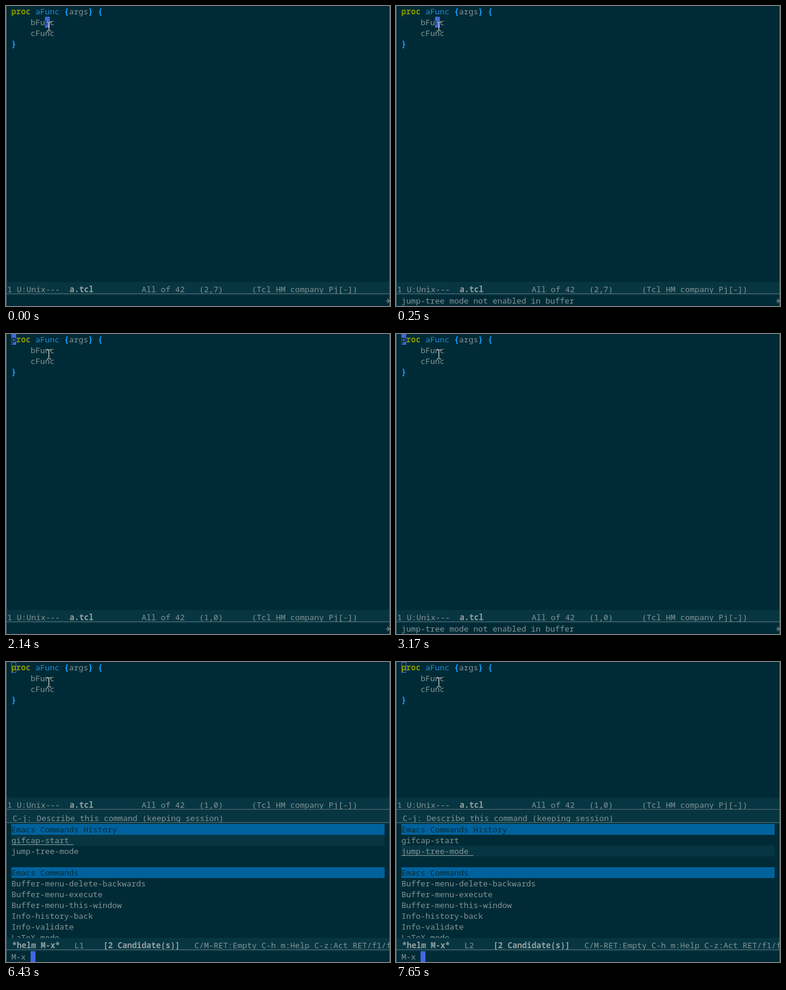
Recreate the animation shown at these times as an HTML page. Size 640 by 500 pixels, loop 8000 ms.

```html
<!DOCTYPE html>
<html lang="en">
<head>
<meta charset="utf-8">
<title>Editor session</title>
<style>
html, body { margin: 0; width: 100%; height: 100%; overflow: hidden; background: #002b36; }
#stage {
  position: relative; width: 640px; height: 500px; overflow: hidden;
  background: #002b36; color: #839496;
  font: 13.3333px/18px "Noto Sans Mono", "DejaVu Sans Mono", monospace;
  font-variant-ligatures: none;
}
#stage div, #stage svg { position: absolute; }
.text { white-space: pre; height: 18px; }
.bar { left: 1px; width: 638px; height: 22px; background: #073642; }
.bar .text { height: 16px; overflow: hidden; }
.bar::after {
  content: ""; position: absolute; left: 0; top: 19px; width: 100%; height: 1px;
  background: #586e75;
}
.bar b { color: #93a1a1; }
.head { left: 9px; width: 622px; height: 18px; background: #00629d; color: #002b36; white-space: pre; }
.pick { left: 9px; width: 622px; height: 18px; background: #073642; }
.pick i { position: absolute; left: 0; top: 16px; height: 1px; background: #839496; }
.cursor { width: 8px; height: 18px; background: #4169e1; color: #002b36; }
.hollow { box-sizing: border-box; background: none; border: 1px solid #4169e1; }
.edge { top: 0; width: 1px; height: 500px; background: #586e75; }
.key { color: #859900; font-weight: bold; }
.fn { color: #268bd2; }
.br { color: #1a9fff; font-weight: bold; }
</style>
</head>
<body>
<div id="stage"></div>
<script>
const LOOP = 8000, HELM = 6430, NEXT = 7650, ROW = 18;
const stage = document.getElementById("stage");
const start = document.timeline.currentTime || 0;

function add(parent, cls, x, y, html = "") {
  const el = document.createElement("div");
  el.className = cls;
  if (x !== null) el.style.left = x + "px";
  el.style.top = y + "px";
  el.innerHTML = html;
  parent.append(el);
  return el;
}
const text = (parent, x, y, html) => add(parent, "text", x, y, html);

function bar(parent, y, x, html) {
  const el = add(parent, "bar", null, y);
  const label = text(el, x - 1, 3, html);
  label.style.width = 640 - x + "px";
  return el;
}

// Shows an element only during the given [from, to] spans of the loop.
function during(el, ...spans) {
  const frames = [{ offset: 0, opacity: 0 }];
  for (const [from, to] of spans) {
    if (from === 0) frames[0].opacity = 1;
    else frames.push({ offset: from / LOOP, opacity: 1 });
    if (to < LOOP) frames.push({ offset: to / LOOP, opacity: 0 });
  }
  const last = frames[frames.length - 1];
  frames.push({ offset: 1, opacity: last.opacity });
  for (const frame of frames) frame.easing = "steps(1, end)";
  const run = el.animate(frames, { duration: LOOP, iterations: Infinity });
  run.startTime = start;
  return el;
}

// Code buffer
[
  '<span class="key">proc</span> <span class="fn">aFunc</span> ' +
    '<span class="br">{</span>args<span class="br">}</span> <span class="br">{</span>',
  "    bFunc",
  "    cFunc",
  '<span class="br">}</span>'
].forEach((line, i) => text(stage, 9, i * ROW, line));

during(add(stage, "cursor", 65, ROW, "n"), [0, 1990]);
during(add(stage, "cursor", 9, 0, "<b>p</b>"), [1990, HELM]);
during(add(stage, "cursor hollow", 9, 0), [HELM, LOOP]);

// Mode lines
const status = pos => "1 U:Unix---  <b>a.tcl</b>          All of 42   (" + pos +
  ")      (Tcl HM company Pj[-])";
during(bar(stage, 460, 2, status("2,7")), [0, 1990]);
during(bar(stage, 460, 2, status("1,0")), [1990, HELM]);

// Echo area
during(text(stage, 9, 482, "jump-tree mode not enabled in buffer"), [250, 1990], [3170, 6280]);
during(text(stage, 9, 482, "Mark set"), [1990, 2140]);

const arrow = add(stage, "", 633, 487,
  '<svg width="6" height="9" fill="none" stroke="#839496" stroke-width="1.2">' +
  '<path d="M0 4.5H6M2.5 1L6 4.5L2.5 8"/></svg>');
during(arrow, [0, HELM]);

// Completion window
const helm = add(stage, "", 0, 0);
during(helm, [HELM, LOOP]);
bar(helm, 226, 2, status("1,0"));
bar(helm, 248, 11, "C-j: Describe this command (keeping session)");

function pick(row, chars, from, to) {
  const el = add(helm, "pick", null, 270 + row * ROW, "<i></i>");
  el.firstChild.style.width = chars * 8 + "px";
  during(el, [from, to]);
}
pick(1, 13, HELM, NEXT);
pick(2, 15, NEXT, LOOP);

[
  "#Emacs Commands History", "gifcap-start", "jump-tree-mode", "", "#Emacs Commands",
  "Buffer-menu-delete-backwards", "Buffer-menu-execute", "Buffer-menu-this-window",
  "Info-history-back", "Info-validate", "LaTeX-mode"
].forEach((line, i) => {
  const y = 270 + i * ROW;
  if (line[0] === "#") add(helm, "head", null, y, line.slice(1));
  else text(helm, 9, y, line);
});

const helmStatus = n => "<b>*helm M-x*</b>   L" + n + "    <b>[2 Candidate(s)]</b>" +
  "   C/M-RET:Empty C-h m:Help C-z:Act RET/f1/f2";
during(bar(helm, 460, 10, helmStatus(1)), [HELM, NEXT]);
during(bar(helm, 460, 10, helmStatus(2)), [NEXT, LOOP]);
text(helm, 9, 482, "M-x");
add(helm, "cursor", 41, 482);

// Mouse pointer and window edges
add(stage, "", 67, 26,
  '<svg width="9" height="16" fill="none" stroke="#f4f0e4">' +
  '<path d="M1 .5H3.5L4.5 1.5L5.5 .5H8M4.5 1V15M1 15.5H3.5L4.5 14.5L5.5 15.5H8"/></svg>');
add(stage, "edge", 0, 0);
add(stage, "edge", 639, 0);
</script>
</body>
</html>
```
